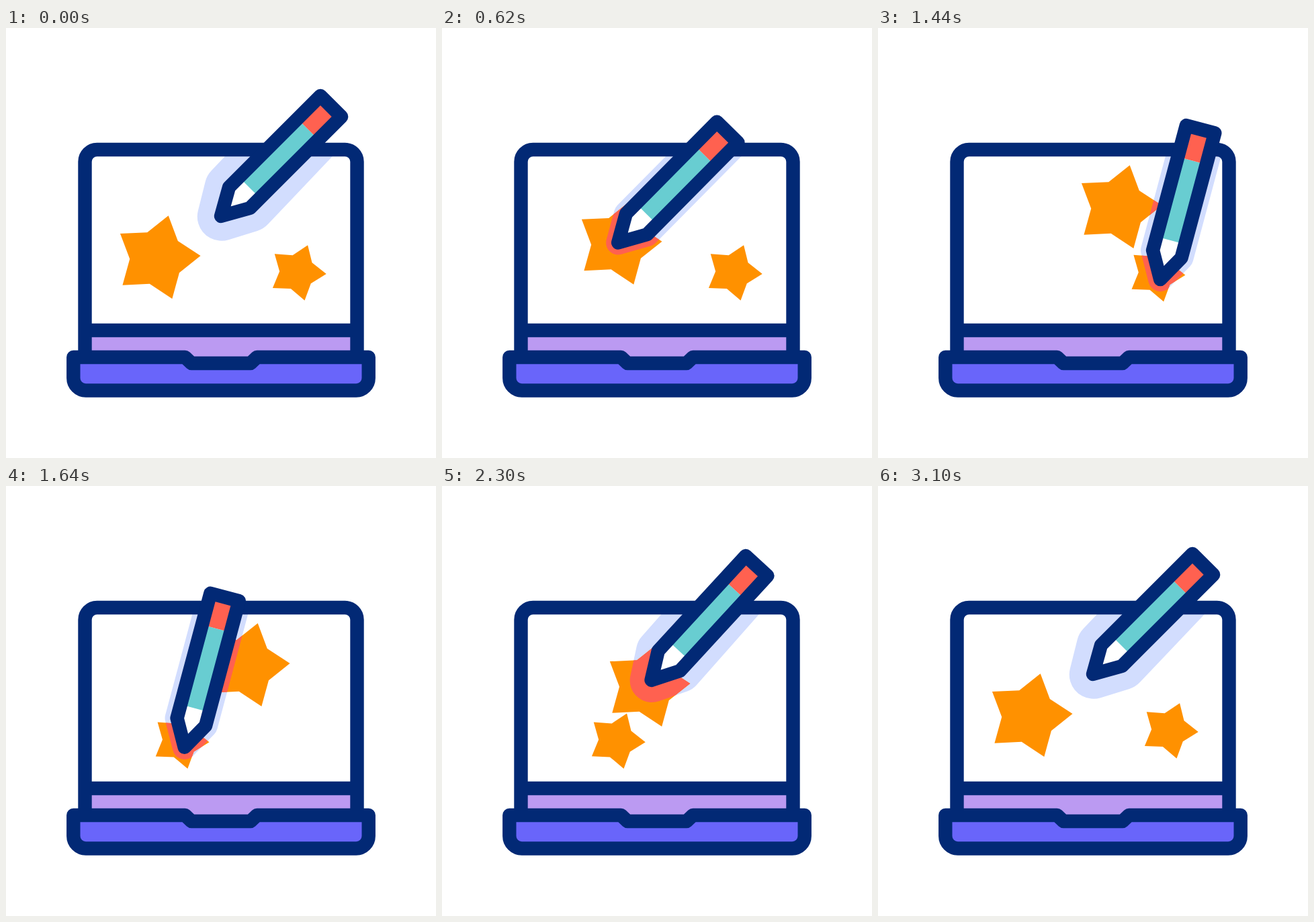
Write an HTML page that moves like this. It is 640 px wide and 640 px high and loops after 3220 ms.

```html
<!DOCTYPE html>
<html lang="en">
<head>
<meta charset="utf-8">
<title>Drawing on a laptop</title>
<style>
  html, body { margin: 0; width: 100%; height: 100%; overflow: hidden; background: #fff; }
  svg { display: block; width: 100vw; height: 100vh; }
  .line { stroke: #022975; stroke-width: 20.4; stroke-linejoin: round; fill: none; }
  .shadow { stroke-linejoin: round; }
</style>
</head>
<body>
<svg viewBox="0 0 640 640">
  <defs>
    <clipPath id="screen"><rect x="118" y="182" width="404" height="268"/></clipPath>
    <!-- tip at the origin, barrel along +x -->
    <path id="body" d="M0 0L39 -22H231.3V22H39Z"/>
    <clipPath id="stars">
      <polygon class="big"/>
      <polygon class="small"/>
    </clipPath>
  </defs>

  <g clip-path="url(#screen)">
    <use href="#body" class="shadow" fill="#d2ddfe" stroke="#d2ddfe"/>
  </g>
  <g fill="#ff9100">
    <polygon class="big"/>
    <polygon class="small"/>
  </g>
  <g clip-path="url(#stars)">
    <use href="#body" class="shadow" fill="#ff6150" stroke="#ff6150"/>
  </g>

  <rect x="118" y="450" width="404" height="45" fill="#bb9af2"/>
  <path class="line" d="M117.500 490V199a18 18 0 0 1 18-18h369a18 18 0 0 1 18 18V490M117.500 450h405"/>
  <path class="line" style="fill:#6965fa" d="M100.300 490H266.500l9.500 9h88l9.500 -9H539.700v31a18.500 18.500 0 0 1-18.500 18.500H118.800a18.500 18.500 0 0 1-18.500-18.500Z"/>

  <g id="pencil">
    <use href="#body" fill="#fff"/>
    <rect x="60" y="-14" width="123" height="28" fill="#68cdd1"/>
    <rect x="183" y="-14" width="42" height="28" fill="#ff6150"/>
    <use href="#body" class="line"/>
  </g>
</svg>
<script>
const LOOP = 3220;

const all = q => [...document.querySelectorAll(q)];
const shadows = all('.shadow');
const pencil = document.getElementById('pencil');

// Smooth 0..1 between two times
function ease(t, from, to) {
  const s = Math.min(1, Math.max(0, (t - from) / (to - from)));
  return s * s * (3 - 2 * s);
}
const lerp = (a, b, k) => a + (b - a) * k;

function starPoints(cx, cy, outer, inner, turn) {
  return Array.from({ length: 10 }, (_, i) => {
    const r = i % 2 ? inner : outer;
    const a = (turn + i * 36) * Math.PI / 180;
    return [cx + r * Math.cos(a), cy + r * Math.sin(a)];
  }).join(' ');
}

function makeStar(name, points, dx, dy) {
  const els = all('.' + name);
  els.forEach(el => el.setAttribute('points', points));
  return k => els.forEach(el => el.setAttribute('transform', `translate(${dx * k} ${dy * k})`));
}
const moveBig = makeStar('big', starPoints(224.4, 342, 65.2, 40.2, -2.6), 133, -75);
const moveSmall = makeStar('small', starPoints(433.4, 363.6, 43.4, 26.3, 3.2), -228, 20);

// Pencil poses: x, y, angle
const rest = [320, 280, -45];
const bigHome = [220.5, 343.5, -45.3];
const bigAway = [366.5, 259.5, -45.3];
const smallHome = [439.5, 372.3, -75];
const smallAway = [212, 394, -75];

function render(t) {
  const toBig = ease(t, 240, 480);
  const dragBig = ease(t, 480, 880);
  const toSmall = ease(t, 1068, 1370);
  const dragSmall = ease(t, 1370, 1766);
  const home = ease(t, 1920, 2380);

  const steps = [[bigHome, toBig], [bigAway, dragBig], [smallHome, toSmall], [smallAway, dragSmall], [rest, home]];
  const [x, y, angle] = steps.reduce((p, [q, k]) => p.map((v, i) => lerp(v, q[i], k)), rest);
  const pose = `translate(${x} ${y}) rotate(${angle})`;
  pencil.setAttribute('transform', pose);

  // The shadow spreads and tilts while the pencil is lifted
  const lift = 1 - toBig + ease(t, 1920, 2450);
  for (const el of shadows) {
    el.setAttribute('transform', `${pose} rotate(${-1.5 * lift} 40 0)`);
    el.setAttribute('stroke-width', 2 * lerp(18, 36, lift));
  }

  moveBig(dragBig - ease(t, 2024, 2664));
  moveSmall(dragSmall - ease(t, 2096, 2744));
}

const start = performance.now();
function tick() {
  render((performance.now() - start) % LOOP);
  requestAnimationFrame(tick);
}
tick();
</script>
</body>
</html>
```
